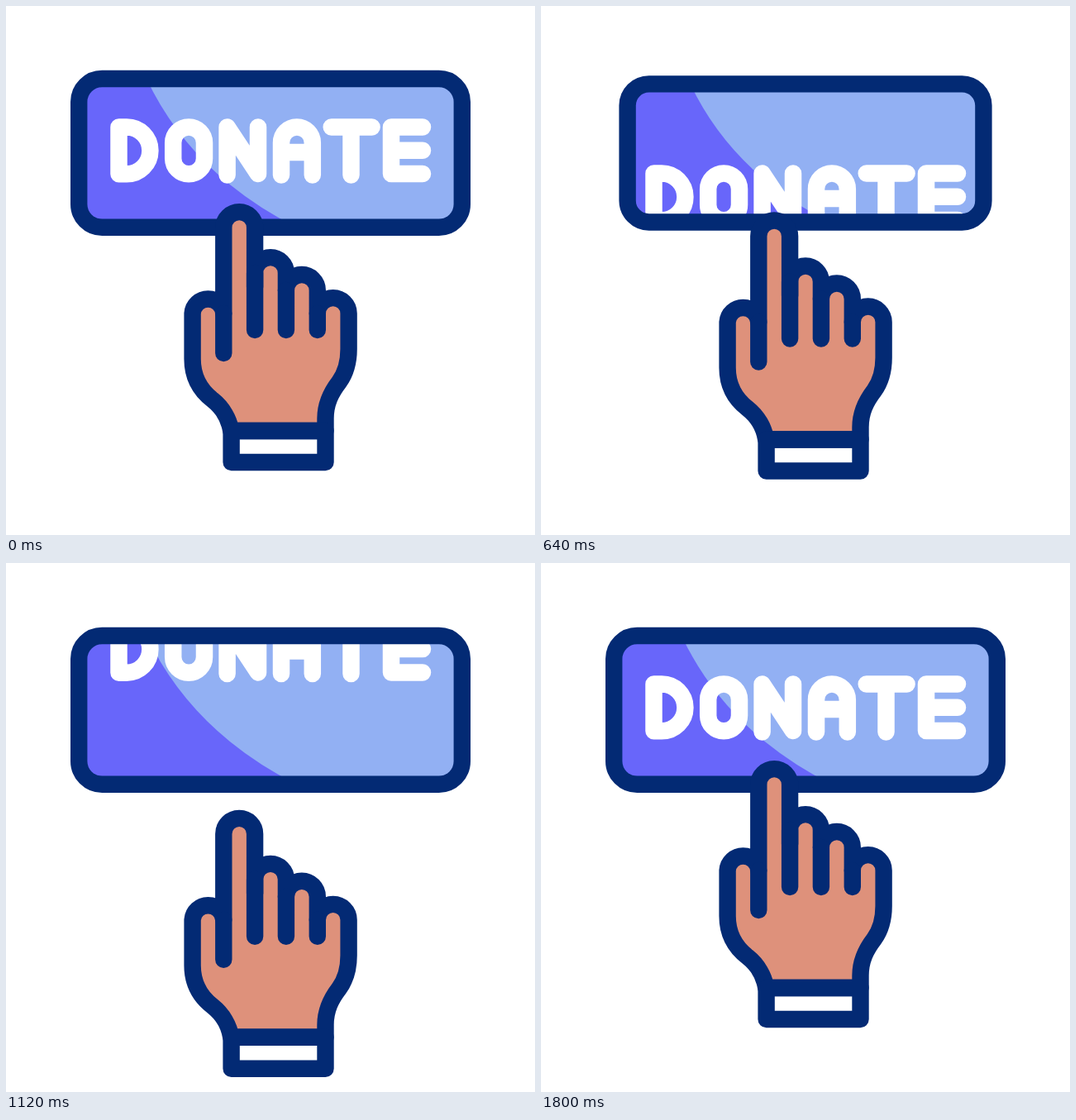
Animation of 640 by 640 pixels, one loop 1920 ms. Source, as an HTML page:

```html
<!DOCTYPE html>
<html lang="en">
<head>
<meta charset="utf-8">
<title>Donate button</title>
<style>
  html, body { margin: 0; width: 100%; height: 100%; overflow: hidden; background: #fff; }
  svg { display: block; width: 100%; height: 100%; }
  .line { fill: none; stroke: #032a74; stroke-width: 20.4; stroke-linecap: round; stroke-linejoin: round; }
  .letters { fill: none; stroke: #fff; stroke-width: 20.5; stroke-linecap: round; stroke-linejoin: round; }
</style>
</head>
<body>
<svg viewBox="0 0 640 640" role="img" aria-label="DONATE">
  <defs>
    <rect id="plate" x="88.2" y="88" width="463.6" height="179.8" rx="28"/>
    <clipPath id="inside"><use id="clipPlate" href="#plate"/></clipPath>
  </defs>

  <g clip-path="url(#inside)">
    <g id="face">
      <use href="#plate" fill="#6866fa"/>
      <path fill="#92b0f3" d="M170 88Q225 204 352 268H560V80H166Z"/>
    </g>
    <g id="word" class="letters">
      <path d="M136.5 146.5H146A28.4 28.4 0 0 1 146 203.3H136.5Z"/>
      <rect x="202.2" y="146.5" width="37.8" height="56.8" rx="18.9"/>
      <path d="M267.6 204.6V146.5L305 203V146.5"/>
      <path d="M333 204.6V165.4A18.9 18.9 0 0 1 370.8 165.4V204.6M333 177H370.8"/>
      <path d="M393.7 146.5H442.6M417.5 146.5V204.6"/>
      <path d="M504 146.5H466V203H504M466 174.7H504"/>
    </g>
  </g>
  <use id="border" href="#plate" class="line"/>

  <g id="hand">
    <path fill="#fff" d="M272.6 514H386.5V552H272.6Z"/>
    <path id="skin" fill="#de917b"/>
    <path id="outline" class="line"/>
    <path class="line" d="M263.3 372V420M301.1 323V392M338.9 344V392M376.8 372V392"/>
    <path class="line" d="M272.6 514H386.5V552H272.6Z"/>
  </g>
</svg>
<script>
const LOOP = 1920, STEP = 40;
const $ = id => document.getElementById(id);
const mix = (a, b, p) => a + (b - a) * p;

// Cubic bezier (.5, 0, .42, 1), solved by bisection
function ease(x) {
  if (x <= 0) return 0;
  if (x >= 1) return 1;
  let lo = 0, hi = 1;
  for (let i = 0; i < 24; i++) {
    const m = (lo + hi) / 2, n = 1 - m;
    if (1.5 * n * n * m + 1.26 * n * m * m + m ** 3 < x) lo = m; else hi = m;
  }
  return lo * lo * (3 - 2 * lo);
}
const ramp = (t, from, to) => ease((t - from) / (to - from));
const pulse = (t, a, b, c, d) => ramp(t, a, b) - ramp(t, c, d);

// The word speeds up out of the bottom, then slows down in from the top
const drift = ms => 56 * (Math.max(0, ms) / 360) ** 2.2;
const wordOffset = t => t < 900 ? drift(t - 280) : -drift(1520 - t);

function handPath(press) {
  const inset = 2.5 * press, tipY = 268 + 1.5 * press, r = 18.9 - inset;
  const arc = (x, y, radius = 18.9) => `A${radius} ${radius} 0 0 1 ${x} ${y}`;
  return `M225.6 427V372${arc(263.3, 372)}V345L${263.3 + inset} ${tipY}` +
    `${arc(301.1 - inset, tipY, r)}L301.1 340V323${arc(338.9, 323)}V344${arc(376.8, 344)}` +
    `V372${arc(414.6, 372)}V415C414.6 431 411 444 403 455C393 468 386.5 481 386.5 499V514` +
    `H272.2C270 500 262 486 250 476.5C235 465 225.6 448 225.6 427Z`;
}

function render(t) {
  const scale = mix(1, 0.9245, pulse(t, 120, 490, 590, 850));
  const zoom = `translate(320 177.8) scale(${scale}) translate(-320 -177.8)`;
  for (const id of ["face", "clipPlate", "border"]) $(id).setAttribute("transform", zoom);
  $("border").style.strokeWidth = 20.4 / scale;

  $("word").setAttribute("transform", `translate(0 ${wordOffset(t)})`);

  const drop = 60 * pulse(t, 465, 1050, 1080, 1800);
  $("hand").setAttribute("transform", `translate(0 ${drop})`);
  const shape = handPath(pulse(t, 120, 360, 360, 600));
  $("skin").setAttribute("d", shape);
  $("outline").setAttribute("d", shape);
}

function tick() {
  render(Math.floor(performance.now() % LOOP / STEP) * STEP);
  requestAnimationFrame(tick);
}
tick();
</script>
</body>
</html>
```
